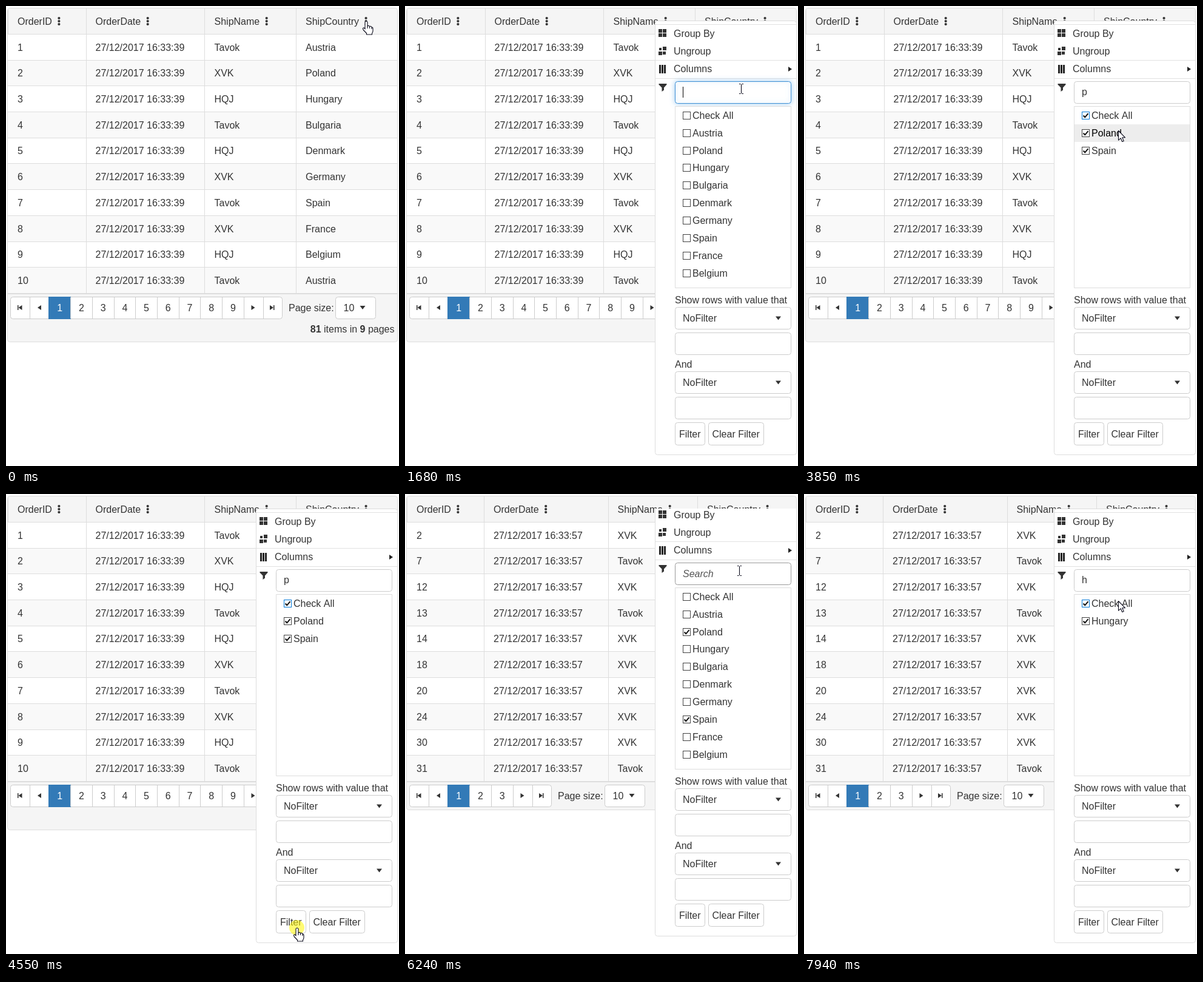
Recreate the animation shown at these times as an HTML page with a canvas. Size 648 by 758 pixels, loop 8 s.

```html
<!DOCTYPE html>
<html lang="en">
<head>
<meta charset="utf-8">
<title>Grid header menu</title>
<style>
html, body { margin: 0; width: 100%; height: 100%; overflow: hidden; background: #fff; }
canvas { display: block; }
</style>
</head>
<body>
<canvas id="stage" width="648" height="758"></canvas>
<script>
const ctx = document.getElementById('stage').getContext('2d');
const LOOP = 8000, FIRST = 436, STEP = 77.35;
const FONT = '16px "Liberation Sans", Arial, sans-serif';
const INK = '#333', LINE = '#ddd', EDGE = '#ccc', PANEL = '#f5f5f5';

const COUNTRIES = ['Austria', 'Poland', 'Hungary', 'Bulgaria', 'Denmark', 'Germany', 'Spain', 'France', 'Belgium'];
const T = 'Tavok', X = 'XVK', H = 'HQJ';
const HEADS = ['OrderID', 'OrderDate', 'ShipName', 'ShipCountry'];

const ALL = {
  ids: [1, 2, 3, 4, 5, 6, 7, 8, 9, 10],
  ships: [T, X, H, T, H, X, T, X, H, T],
  country: i => COUNTRIES[i % 9],
  date: '27/12/2017 16:33:39',
  text: [19, 147.5, 343.5, 494], lines: [132, 327, 478],
  pages: 9, items: 81, bottom: 553, countY: 538
};
const FILTERED = {
  ids: [2, 7, 12, 13, 14, 18, 20, 24, 30, 31],
  ships: [X, T, X, T, X, X, X, X, X, T],
  country: i => FILTERED.ships[i] === X ? 'Poland' : 'Spain',
  date: '27/12/2017 16:33:57',
  text: [19, 146, 350.5, 498], lines: [130, 335, 482],
  pages: 3, items: 25, bottom: 520, countY: 501
};

// Pointer path: step, x, y, shape
const PATH = [
  [-9, 594, 25, 'hand'], [2, 594, 25, 'hand'], [6, 582, 76, 'hand'], [10, 572, 100, 'hand'],
  [12, 554, 136, 'beam'], [30, 554, 136, 'beam'], [33, 512, 162, 'arrow'], [36, 468, 177, 'arrow'],
  [40, 468, 177, 'arrow'], [41, 512, 186, 'arrow'], [43, 512, 186, 'arrow'], [44, 518, 205, 'arrow'],
  [49, 480, 715, 'hand'], [54, 480, 715, 'hand'], [55, 475, 227, 'arrow'], [57, 475, 227, 'arrow'],
  [66, 600, 24, 'hand'], [71, 600, 24, 'hand'], [75, 551, 126, 'beam'], [79, 537, 142, 'beam'],
  [89, 537, 142, 'beam'], [91, 505, 163, 'arrow'], [93, 468, 177, 'arrow'], [95, 468, 177, 'arrow'],
  [97, 518, 176, 'arrow']
];
// Click marks: first step, end step, x, y
const CLICKS = [
  [0, 3, 593.5, 24], [12, 16, 557.5, 140.5], [38, 41, 470.5, 178.5], [53, 55, 479.5, 714.5],
  [69, 72, 599, 23], [82, 86, 540.5, 146.5], [94, 96, 470.5, 178.5]
];

const within = (v, a, b) => v >= a && v < b;

function rect(x, y, w, h, color) {
  ctx.fillStyle = color;
  ctx.fillRect(x, y, w, h);
}

function box(x, y, w, h, r, fill, edge) {
  ctx.beginPath();
  ctx.roundRect(x + 0.5, y + 0.5, w - 1, h - 1, r);
  if (fill) { ctx.fillStyle = fill; ctx.fill(); }
  if (edge) { ctx.strokeStyle = edge; ctx.lineWidth = 1; ctx.stroke(); }
}

function text(s, x, y, color = INK, style = '') {
  ctx.font = style + ' ' + FONT;
  ctx.fillStyle = color;
  ctx.fillText(s, x, y);
  return ctx.measureText(s).width;
}

function poly(points, color) {
  ctx.beginPath();
  points.forEach(([x, y]) => ctx.lineTo(x, y));
  ctx.closePath();
  ctx.fillStyle = color;
  ctx.fill();
}

function sideArrow(x, y, dir, color = INK, h = 4) {
  poly([[x - 3 * dir, y - h], [x + 3 * dir, y], [x - 3 * dir, y + h]], color);
}

function downArrow(x, y) {
  poly([[x - 4.5, y - 3], [x + 4.5, y - 3], [x, y + 3]], INK);
}

function disc(x, y, r, color) {
  ctx.beginPath();
  ctx.arc(x, y, r, 0, 7);
  ctx.fillStyle = color;
  ctx.fill();
}

function drawGrid(g) {
  const lineY = i => Math.floor(46.4 + 42.7 * i);
  box(2, 3, 644, g.bottom - 2, 4, PANEL, LINE);
  for (let i = 0; i < 10; i++) {
    const y = lineY(i);
    rect(3, y, 642, lineY(i + 1) - y, i % 2 ? '#f9f9f9' : '#fff');
    rect(3, y, 642, 1, LINE);
    const base = Math.floor(74.1 + 42.7 * i);
    [g.ids[i], g.date, g.ships[i], g.country(i)].forEach((s, c) => text(s, g.text[c], base));
  }
  rect(3, 473, 642, 2, LINE);
  rect(3, 6, 1, 40, LINE);
  g.lines.forEach(x => rect(x, 4, 1, 470, LINE));
  HEADS.forEach((s, c) => {
    const x = g.text[c] + text(s, g.text[c], 31) + 11.5;
    [20, 25, 30].forEach(y => disc(x, y, 2.1, INK));
  });
  drawPager(g);
}

function drawPager(g) {
  const pageX = i => 71 + 35.7 * i;
  const next = Math.round(pageX(g.pages)), end = next + 63;
  box(7, 479, end - 6, 37, 4, '#fff', EDGE);
  rect(39, 480, 1, 35, EDGE);
  rect(next, 480, 1, 35, EDGE);
  rect(next + 32, 480, 1, 35, EDGE);
  for (let i = 0; i < g.pages; i++) {
    const x = Math.floor(pageX(i));
    if (i) rect(x, 480, 1, 35, EDGE);
    else rect(70, 479, 37, 37, '#337ab7');
    text(i + 1, pageX(i) + 13.3, 503, i ? INK : '#fff');
  }
  rect(19, 493, 1.5, 8, INK);
  sideArrow(23.5, 497, -1);
  sideArrow(55, 497, -1);
  sideArrow(next + 15.5, 497, 1);
  sideArrow(next + 46, 497, 1);
  rect(next + 49, 493, 1.5, 8, INK);

  text('Page size:', end + 11, 503);
  box(end + 88, 479, 67, 37, 4, '#fff', EDGE);
  text('10', end + 101.5, 503);
  downArrow(end + 133, 497);

  const parts = [[g.items, 'bold'], [' items in ', ''], [g.pages, 'bold'], [' pages', '']];
  const width = parts.reduce((sum, [s, style]) => {
    ctx.font = style + ' ' + FONT;
    return sum + ctx.measureText(s).width;
  }, 0);
  let x = 640.5 - width;
  parts.forEach(([s, style]) => { x += text(s, x, g.countY, INK, style); });
}

function checkbox(y, on, hot) {
  rect(458, y, 13, 13, hot ? '#0078d7' : '#444');
  rect(459, y + 1, 11, 11, '#fff');
  if (!on) return;
  ctx.beginPath();
  ctx.moveTo(460.5, y + 6.5);
  ctx.lineTo(463.3, y + 9.3);
  ctx.lineTo(468.5, y + 3.2);
  ctx.strokeStyle = '#111';
  ctx.lineWidth = 2;
  ctx.stroke();
}

function drawSearch(m, pointer) {
  ctx.save();
  if (m.focus) {
    ctx.shadowColor = 'rgba(102,175,233,.6)';
    ctx.shadowBlur = 8;
  }
  const edge = m.focus ? '#3d8fd4' : pointer.shape === 'beam' ? '#999' : EDGE;
  box(445, 124, 192, 37, 4, '#fff', edge);
  ctx.restore();
  if (m.query) text(m.query, 458, 147);
  else if (!m.focus) text('Search', 458, 148, '#555', 'italic');
  if (m.focus && m.caret > 0) {
    ctx.globalAlpha = m.caret;
    rect(m.query ? 467 : 458, 133, 1, 18, '#000');
    ctx.globalAlpha = 1;
  }
}

function drawList(m, pointer, localY) {
  box(445, 165, 192, 300, 0, '#fff', LINE);
  const match = COUNTRIES.filter(c => c.toLowerCase().includes(m.filter));
  ['Check All', ...match].forEach((name, i) => {
    const base = Math.floor(186.3 + 28.87 * i);
    const hover = i > 0 && pointer.shape === 'arrow' && within(localY, base - 20, base + 9);
    if (hover) rect(446, base - 20, 190, 29, '#ededed');
    checkbox(base - 12, i ? m.checked(name) : m.all, !i && m.all);
    text(name, 474, base, hover ? '#000' : INK);
  });
}

function drawMenu(m, pointer) {
  const localY = pointer.y + m.shift;
  ctx.save();
  ctx.beginPath();
  ctx.rect(412, 24, 236, 734);
  ctx.clip();
  ctx.translate(0, -m.shift);
  box(412, 24, 234, 716, 4, '#fff', LINE);

  ['Group By', 'Ungroup', 'Columns'].forEach((name, i) => {
    const y = [31, 60, 89][i];
    const hover = pointer.shape === 'hand' && within(localY, y, y + 29);
    if (hover) rect(413, y, 232, 30, '#ededed');
    text(name, 443, [51, 80, 109][i], hover ? '#000' : INK);
  });
  [30, 89, 119].forEach(y => rect(413, y, 232, 1, '#e2e2e2'));

  [[418, 38], [425, 38], [418, 45], [425, 45]].forEach(([x, y]) => rect(x, y, 6, 6, INK));
  [[419, 69, 4], [425, 67, 6], [418, 75, 6], [425, 75, 5]].forEach(([x, y, s]) => rect(x, y, s, s, INK));
  [419, 423, 427].forEach(x => rect(x, 97, 3, 14, '#222'));
  sideArrow(635, 104, 1, '#222');
  poly([[418.5, 128], [431.5, 128], [431.5, 129.5], [427, 134.5], [427, 138.5], [423.5, 141], [423.5, 134.5], [418.5, 129.5]], INK);

  drawSearch(m, pointer);
  drawList(m, pointer, localY);

  text('Show rows with value that', 445, 490);
  text('And', 445, 596);
  [496, 602].forEach(y => {
    box(445, y, 192, 37, 4, '#fff', EDGE);
    text('NoFilter', 458, y + 24);
    downArrow(615.5, y + 18.5);
    box(445, y + 42, 192, 37, 4, '#fff', EDGE);
  });
  box(445, 686, 50, 38, 4, '#fff', EDGE);
  text('Filter', 452, 711);
  box(500, 686, 92, 38, 4, '#fff', EDGE);
  text('Clear Filter', 506.5, 711);
  ctx.restore();
}

const SHAPES = {
  hand: new Path2D('M-2 12V1.5Q0-1.5 2 1.5V8Q4.5 6.5 5.5 8.7Q8 7.5 9 10Q11 9.5 11 12.5V16Q11 18 9.5 20V22H.5V20L-4.7 14.5Q-6.5 11.5-4.5 11Q-3.5 10.5-2 13Z'),
  knuckles: new Path2D('M2 8V12M5.5 8.7V12M9 10V13'),
  arrow: new Path2D('M.5.5V16.2L4.2 12.8L6.7 18.5L9.2 17.4L6.8 11.8H11.6Z'),
  beam: new Path2D('M-3-7.5H-.5M1.5-7.5H4M.5-7V8M-3 8.5H-.5M1.5 8.5H4')
};

function drawPointer({ x, y, shape }) {
  ctx.save();
  ctx.translate(Math.round(x), Math.round(y));
  ctx.lineJoin = 'round';
  ctx.lineWidth = 1.1;
  ctx.strokeStyle = '#0b0b1c';
  if (shape !== 'beam') {
    ctx.fillStyle = '#fff';
    ctx.fill(SHAPES[shape]);
  }
  ctx.stroke(SHAPES[shape]);
  if (shape === 'hand') ctx.stroke(SHAPES.knuckles);
  ctx.restore();
}

function pointerAt(s) {
  let i = PATH.length - 1;
  while (i > 0 && PATH[i][0] > s) i--;
  const a = PATH[i], b = PATH[i + 1] || a;
  const p = b === a ? 0 : Math.max(0, (s - a[0]) / (b[0] - a[0]));
  const e = p * p * (3 - 2 * p);
  return { x: a[1] + (b[1] - a[1]) * e, y: a[2] + (b[2] - a[2]) * e, shape: a[3] };
}

function menuAt(s) {
  const second = s > 60;
  const start = second ? 71.23 : 2.92;
  if (s < start || within(s, 54, 60)) return null;
  const left = Math.max(0, 1 - (s - start) / 5.82);
  const m = { shift: Math.round(716 * left ** 4) };
  if (second) {
    m.focus = within(s, 82, 94);
    m.query = s >= 88 ? 'h' : '';
    m.filter = s >= 89 ? 'h' : '';
    m.all = s >= 95;
    m.checked = name => name === 'Poland' || name === 'Spain' || (m.all && name === 'Hungary');
    m.caret = 1;
  } else {
    m.focus = within(s, 13, 38);
    m.query = s >= 24 ? 'p' : '';
    m.filter = s >= 25 ? 'p' : '';
    m.all = s >= 39;
    m.checked = () => s >= 41;
    m.caret = s < 24 ? Math.min(1, (21 - s) / 3) : 1;
  }
  return m;
}

function draw(t) {
  // The screen refreshes in even steps
  const s = Math.floor((t - FIRST) / STEP);
  const pointer = pointerAt(s), menu = menuAt(s);
  rect(0, 0, 648, 758, '#fff');
  drawGrid(s < 55 ? ALL : FILTERED);
  if (menu) drawMenu(menu, pointer);
  CLICKS.forEach(([from, to, x, y]) => {
    if (within(s, from, to)) disc(x, y, 12.5, 'rgba(255,246,0,.55)');
  });
  drawPointer(pointer);
}

const begin = performance.now();
function tick() {
  draw((performance.now() - begin) % LOOP);
  requestAnimationFrame(tick);
}
tick();
</script>
</body>
</html>
```
